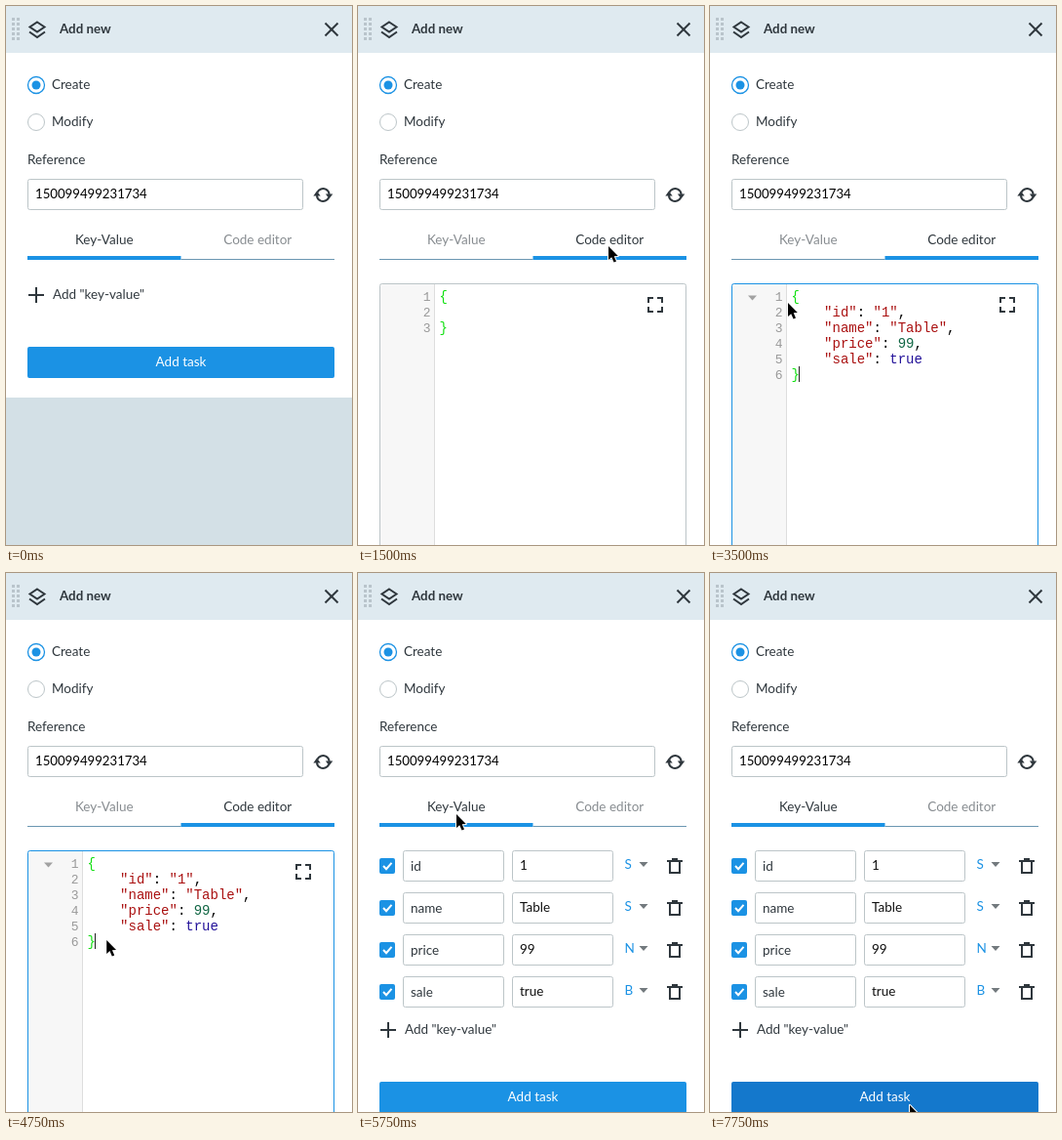
Recreate the animation shown at these times as an HTML page with a canvas. Size 355 px wide and 552 px high, loop 8000 ms.

```html
<!DOCTYPE html>
<html lang="en">
<head>
<meta charset="utf-8">
<title>Add new task</title>
<style>
  html, body { margin: 0; width: 100%; height: 100%; overflow: hidden; background: #fff; }
  canvas { display: block; width: 355px; height: 552px; }
</style>
</head>
<body>
<canvas id="stage"></canvas>
<script>
const W = 355, H = 552, LOOP = 8000, STEP = 250;
const BLUE = '#1b92e4', INK = '#2f373d', BORDER = '#bcc5c8', MUTED = '#878c90';
const SANS = 'Lato, sans-serif', MONO = '"Liberation Mono", monospace';
const LEFT = 22, RIGHT = 337, MID = 179.5;
const CODE_X = 83.5, CODE_Y = 290, LINE = 16, CHAR = 8.4;

const canvas = document.getElementById('stage');
const ctx = canvas.getContext('2d');
const ratio = window.devicePixelRatio || 1;
canvas.width = W * ratio;
canvas.height = H * ratio;

const emptyCode = ['{', '', '}'];
const filledCode = ['{', '    "id": "1",', '    "name": "Table",', '    "price": 99,', '    "sale": true', '}'];
const fields = [['id', '1', 'S'], ['name', 'Table', 'S'], ['price', '99', 'N'], ['sale', 'true', 'B']];

// Pointer path: time, x, y
const path = [
  [500, 274, 242], [1000, 257, 246], [1500, 257, 246], [2250, 93, 326], [2500, 87, 310],
  [2750, 80, 304], [3500, 80, 304], [4000, 104, 421], [4500, 104, 421], [5250, 101, 247],
  [6000, 101, 247], [6750, 225, 446], [7250, 207, 486], [7500, 205, 526], [7750, 205, 545]
];

function pointerAt(t) {
  if (t < path[0][0]) return null;
  const next = path.findIndex(p => p[0] > t);
  if (next < 0) return path[path.length - 1].slice(1);
  const [t0, x0, y0] = path[next - 1], [t1, x1, y1] = path[next];
  const u = (t - t0) / (t1 - t0), k = u * u * (3 - 2 * u);
  return [x0 + (x1 - x0) * k, y0 + (y1 - y0) * k];
}

function rect(x, y, w, h, color) {
  ctx.fillStyle = color;
  ctx.fillRect(x, y, w, h);
}

function box(x, y, w, h, { fill, stroke, r = 2 }) {
  ctx.beginPath();
  ctx.roundRect(x, y, w, h, r);
  if (fill) { ctx.fillStyle = fill; ctx.fill(); }
  if (stroke) { ctx.strokeStyle = stroke; ctx.lineWidth = 1; ctx.stroke(); }
}

function text(str, x, y, { color = INK, size = 13.5, weight = 400, align = 'left', family = SANS } = {}) {
  ctx.font = `${weight} ${size}px ${family}`;
  ctx.fillStyle = color;
  ctx.textAlign = align;
  ctx.fillText(str, x, y);
}

function trace(points) {
  ctx.beginPath();
  points.forEach(([x, y], i) => i ? ctx.lineTo(x, y) : ctx.moveTo(x, y));
}

function line(points, color = INK, width = 2, closed = false) {
  trace(points);
  if (closed) ctx.closePath();
  ctx.strokeStyle = color;
  ctx.lineWidth = width;
  ctx.stroke();
}

function polygon(points, color) {
  trace(points);
  ctx.closePath();
  ctx.fillStyle = color;
  ctx.fill();
}

function circle(x, y, r) {
  ctx.beginPath();
  ctx.arc(x, y, r, 0, Math.PI * 2);
}

function downArrow(x, y, color) {
  polygon([[x - 4.5, y - 2], [x + 4.5, y - 2], [x, y + 3]], color);
}

function drawHeader() {
  rect(0, 0, W, 48, '#dfeaf0');
  for (let row = 0; row < 5; row++) {
    for (const x of [6, 11]) rect(x, 12 + row * 5, 3, 3, '#b9c4cb');
  }
  line([[32, 16.5], [39.5, 21.5], [32, 26.5], [24.5, 21.5]], INK, 2, true);
  line([[24, 26.5], [32, 32], [40, 26.5]]);
  text('Add new', 55, 28, { weight: 700, size: 13.3 });
  line([[327.5, 17.5], [340.5, 30.5]]);
  line([[340.5, 17.5], [327.5, 30.5]]);
}

function drawRadio(y, label, checked) {
  circle(31, y, 8.5);
  ctx.strokeStyle = checked ? BLUE : BORDER;
  ctx.lineWidth = checked ? 1.3 : 1;
  ctx.stroke();
  if (checked) {
    circle(31, y, 4.5);
    ctx.fillStyle = BLUE;
    ctx.fill();
  }
  text(label, 47, y + 4);
}

function drawRefresh() {
  const x = 325.3, y = 193.5, turn = Math.PI / 180;
  ctx.strokeStyle = INK;
  ctx.lineWidth = 2;
  for (const start of [205, 25]) {
    ctx.beginPath();
    ctx.arc(x, y, 6.4, start * turn, (start + 150) * turn);
    ctx.stroke();
  }
  for (const s of [1, -1]) {
    polygon([[x + s * 2.6, y - s * 1], [x + s * 10, y - s * 1], [x + s * 6.3, y + s * 4]], INK);
  }
}

function drawForm() {
  drawRadio(81, 'Create', true);
  drawRadio(119, 'Modify', false);
  text('Reference', LEFT, 162);
  box(22.5, 177.5, 282, 31, { stroke: BORDER });
  text('150099499231734', 30, 197, { color: '#000', size: 13.2 });
  drawRefresh();
}

function drawTab(label, x, active) {
  text(label, x + 78.75, 244, { align: 'center', color: active ? INK : MUTED });
  if (active) rect(x, 256, 157.5, 4, BLUE);
  else rect(x, 259, 157.5, 1, '#6b97b2');
}

function drawAdd(y) {
  rect(23, y - 1, 16, 2, INK);
  rect(30, y - 8, 2, 16, INK);
  text('Add "key-value"', 48, y + 4);
}

function drawButton(y, hover) {
  box(LEFT, y, RIGHT - LEFT, 32, { fill: hover ? '#1478cc' : BLUE });
  text('Add task', MID, y + 20, { color: '#fff', align: 'center' });
}

function drawTrash(x, y) {
  rect(x - 8, y - 6, 16, 2, INK);
  rect(x - 3, y - 8, 6, 2, INK);
  line([[x - 5, y - 5], [x - 5, y + 7], [x + 5, y + 7], [x + 5, y - 5]]);
}

function drawField([key, value, type], i) {
  const y = 285 + i * 43;
  box(22, y + 7, 16, 16, { fill: BLUE });
  line([[26, y + 15], [29, y + 18.2], [34.5, y + 11.8]], '#fff');
  box(46.5, y - 0.5, 103, 31, { stroke: BORDER });
  box(158.5, y - 0.5, 103, 31, { stroke: BORDER });
  text(key, 54, y + 20);
  text(value, 166, y + 19, { color: '#111' });
  text(type, 273.5, y + 18, { color: BLUE });
  downArrow(293, y + 13, '#737a7e');
  drawTrash(325, y + 15);
}

function tokenColor(token, matched) {
  if (token[0] === '"') return '#aa1111';
  if (/^\d/.test(token)) return '#116644';
  if (token === 'true') return '#221199';
  if (/[{}]/.test(token)) return matched ? '#10e010' : '#000';
  return '#000';
}

function drawCode(lines, matched) {
  lines.forEach((row, i) => {
    const y = CODE_Y + i * LINE + 12;
    text(i + 1, 74.5, y, { family: MONO, size: 13, color: '#999', align: 'right' });
    for (const m of row.matchAll(/"[^"]*"|\d+|true|\S/g)) {
      text(m[0], CODE_X + m.index * CHAR, y, { family: MONO, size: 14, color: tokenColor(m[0], matched) });
    }
  });
}

function drawSelection(firstLine, x) {
  for (let i = firstLine; i < 2; i++) {
    const start = i === firstLine ? x : CODE_X;
    rect(start, CODE_Y + i * LINE - 0.5, 332 - start, LINE, '#d7d4f0');
  }
  rect(CODE_X, CODE_Y + 2 * LINE - 0.5, CHAR, LINE, '#d7d4f0');
}

function drawExpand() {
  for (const sx of [-1, 1]) for (const sy of [-1, 1]) {
    const x = 305 + sx * 7, y = 306 + sy * 7;
    line([[x - sx * 5, y], [x, y], [x, y - sy * 5]]);
  }
}

function drawEditor(t) {
  const focused = t >= 2250 && t < 5500;
  const selecting = t >= 2500 && t < 3250;
  rect(23, 285, 55, H, '#f7f7f7');
  rect(78, 285, 1, H, '#ddd');
  box(22.5, 284.5, 314, 300, { stroke: focused ? BLUE : BORDER });
  if (t >= 2250) downArrow(43.5, 298.5, '#a2a2a2');
  if (selecting) {
    if (t < 2750) drawSelection(1, CODE_X + CHAR);
    else drawSelection(0, CODE_X);
  }
  drawCode(t < 3250 ? emptyCode : filledCode, !selecting);
  if (focused) {
    const row = t < 2500 ? 2 : t < 2750 ? 1 : t < 3250 ? 0 : 5;
    const col = row ? 1 : 0;
    rect(Math.round(CODE_X + col * CHAR - 0.9), CODE_Y + row * LINE - 1, 1, LINE, '#222');
  }
  drawExpand();
}

function drawPointer([x, y]) {
  ctx.save();
  ctx.translate(x, y);
  ctx.lineJoin = 'round';
  const shape = [[0, 0], [0, 14], [3.2, 11.2], [5.6, 16.6], [8, 15.6], [5.7, 10.3], [9.8, 10]];
  line(shape, '#fff', 2, true);
  polygon(shape, '#000');
  ctx.restore();
}

function draw(t) {
  const editing = t >= 1500 && t < 5750;
  const filled = t >= 5750;
  ctx.setTransform(ratio, 0, 0, ratio, 0, 0);
  rect(0, 0, W, H, '#fff');
  drawHeader();
  drawForm();
  drawTab('Key-Value', LEFT, !editing || t >= 5250);
  drawTab('Code editor', MID, editing || (t >= 500 && t < 1500));
  if (editing) {
    drawEditor(t);
  } else if (filled) {
    fields.forEach(drawField);
    drawAdd(468);
    drawButton(521, t >= 7500);
  } else {
    drawAdd(296);
    drawButton(349, false);
    rect(0, 401, W, H - 401, '#d3e0e6');
  }
  const pointer = pointerAt(t);
  if (pointer) drawPointer(pointer);
}

function tick() {
  const t = performance.now() % LOOP;
  draw(Math.floor(t / STEP) * STEP);
  requestAnimationFrame(tick);
}
tick();
</script>
</body>
</html>
```
